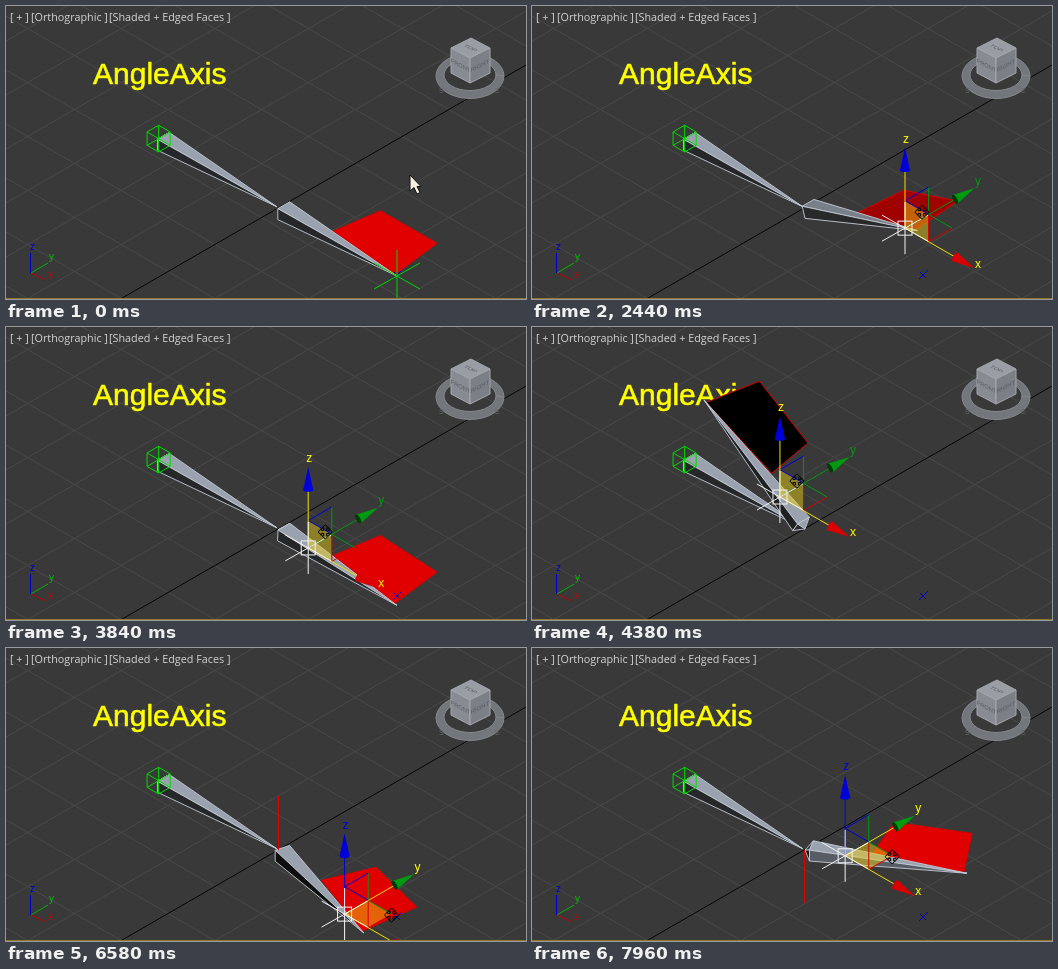
Write an HTML page with a canvas that moves like this. It is 520 by 293 pixels and loops after 8 s.

```html
<!DOCTYPE html>
<html>
<head>
<meta charset="utf-8">
<style>
html, body { margin: 0; width: 100%; height: 100%; overflow: hidden; background: #393939; }
canvas { display: block; }
</style>
</head>
<body>
<canvas id="stage" width="520" height="293"></canvas>
<script>
const ctx = document.getElementById('stage').getContext('2d');
const LOOP = 8000, STEP = 77.3;
const SANS = '"Liberation Sans", Arial, sans-serif';
const UI = '"Open Sans", sans-serif';
const AXES = { x: [1, 0, 0], y: [0, 1, 0], z: [0, 0, 1] };
const COLORS = { x: '#d80000', y: '#009a10', z: '#0000d8' };
const LIGHT = [0.6, -0.1, 0.79];

const sub = (a, b) => a.map((v, i) => v - b[i]);
const add = (a, b) => a.map((v, i) => v + b[i]);
const mul = (a, s) => a.map(v => v * s);
const dot = (a, b) => a[0] * b[0] + a[1] * b[1] + a[2] * b[2];
const cross = (a, b) => [a[1] * b[2] - a[2] * b[1], a[2] * b[0] - a[0] * b[2], a[0] * b[1] - a[1] * b[0]];
const project = ([x, y, z]) => [273 + 118 * (x + y), 202 + 68 * (x - y) - 137 * z];

// Eased progress from 0 to 1 between two times
function ease(t, from, to) {
  const u = Math.min(1, Math.max(0, (t - from) / (to - from)));
  return u * u * (3 - 2 * u);
}
const swing = (t, from, to, degrees) =>
  degrees * Math.sin(2 * Math.PI * Math.min(1, Math.max(0, (t - from) / (to - from))));

// The goal is pulled in close to the joint, circled around it, and put back
const pullIn = (t, start) => 1 - 0.752 * ease(t, start, start + 660);

const DRAGS = [
  { from: 70, to: 950, axes: 'xy', cursor: [47, 1],
    degrees: t => swing(t, 70, 850, -20), reach: () => 1 },
  { from: 1550, to: 2290, axes: 'y', cursor: [33, -14],
    degrees: t => swing(t, 1550, 2270, 15), reach: () => 1.02 - 0.02 * (t => t)(1) },
  { from: 2290, to: 6100, axes: 'xz', cursor: [17, -16],
    degrees: t => 86 * ease(t, 2290, 2830) - 146 * ease(t, 2830, 3411)
      + 315 * ease(t, 3411, 5000) + 105 * ease(t, 5320, 6100),
    reach: t => pullIn(t, 2290) + 0.752 * ease(t, 5320, 6100) },
  { from: 6100, to: 8000, axes: 'xy', cursor: [47, 1],
    degrees: t => -329 * ease(t, 6380, 7960), reach: t => pullIn(t, 6340) }
];
DRAGS[1].reach = t => 1 / Math.cos(DRAGS[1].degrees(t) * Math.PI / 180);

function path(points, stroke, fill, width = 1) {
  ctx.beginPath();
  points.forEach(p => ctx.lineTo(p[0], p[1]));
  if (fill) { ctx.closePath(); ctx.fillStyle = fill; ctx.fill(); }
  if (stroke) { ctx.strokeStyle = stroke; ctx.lineWidth = width; ctx.stroke(); }
}

function label(text, x, y, color, size, font = SANS) {
  ctx.font = size + 'px ' + font;
  ctx.fillStyle = color;
  ctx.fillText(text, x, y);
}

function drawGrid() {
  ctx.fillStyle = '#393939';
  ctx.fillRect(0, 0, 520, 293);
  for (let i = -7; i < 8; i++) {
    const up = 359 + i * 54, down = 10 + i * 54;
    path([[0, up], [520, up - 300]], '#494949');
    path([[0, down], [520, down + 300]], '#494949');
  }
  path([[0, 359], [520, 59]], '#000');
}

function drawTexts() {
  label('[ + ]', 4, 15, '#d4d4d4', 10.8, UI);
  label('[Orthographic ]', 25, 15, '#d4d4d4', 10.8, UI);
  label('[Shaded + Edged Faces ]', 103, 15, '#d4d4d4', 10.8, UI);
  label('AngleAxis', 87, 78, '#ffff00', 30);
  ctx.strokeStyle = '#ffff00';
  ctx.lineWidth = 0.6;
  ctx.strokeText('AngleAxis', 87, 78);
}

// One cube face spanned by two edges that leave the near corner
function cubeFace(text, u, v, fill, right, down) {
  const corner = [464, 52], far = add(add(corner, u), v);
  path([corner, add(corner, u), far, add(corner, v), corner], '#a4a7ac', fill);
  ctx.save();
  ctx.transform(right[0] / 20, right[1] / 20, down[0] / 25, down[1] / 25,
    (corner[0] + far[0]) / 2, (corner[1] + far[1]) / 2);
  ctx.textAlign = 'center';
  label(text, 0, 2, '#585c62', 6);
  ctx.restore();
}

function drawViewCube() {
  ctx.beginPath();
  ctx.ellipse(464, 70, 34, 22.5, 0, 0, 7);
  ctx.ellipse(464, 69, 26, 15.5, 0, 0, 7);
  ctx.fillStyle = '#73767a';
  ctx.fill('evenodd');
  ctx.strokeStyle = '#85888c';
  ctx.lineWidth = 1;
  ctx.stroke();
  label('S', 433, 87, '#666', 7);
  label('E', 489, 87, '#666', 7);
  const left = [-19, -10], right = [20, -10], down = [0, 25];
  cubeFace('TOP', left, right, '#9a9da3', mul(left, -1), mul(right, -1));
  cubeFace('FRONT', left, down, '#888b92', mul(left, -1), down);
  cubeFace('RIGHT', right, down, '#7c7f86', right, down);
}

function drawTripod() {
  path([[24.5, 267], [24.5, 247]], '#0000c8');
  path([[25, 267], [42, 257]], '#00b400');
  path([[25, 267], [40, 274]], '#c00000');
  label('z', 24, 244, '#0000d8', 10);
  label('y', 43, 254, '#00c000', 10);
  label('x', 42, 272, '#d00000', 10);
}

function drawRootCube() {
  const h = 0.049, corner = i => [-1.02 + (i & 1 ? h : -h), i & 2 ? h : -h, i & 4 ? h : -h];
  for (let i = 0; i < 8; i++)
    for (const bit of [1, 2, 4])
      if (!(i & bit)) path([corner(i), corner(i | bit)].map(project), '#00d800');
}

function outward(points, centre) {
  let n = cross(sub(points[1], points[0]), sub(points[2], points[0]));
  n = mul(n, 1 / Math.hypot(...n));
  return dot(n, sub(points[0], centre)) < 0 ? mul(n, -1) : n;
}

const brightness = n => Math.min(1, Math.max(0, dot(n, LIGHT) / 0.79));

function drawBone(place) {
  const ring = [[-1, 1], [1, 1], [1, -1], [-1, -1]].map(([y, z]) => place([0.04, y * 0.05, z * 0.04]));
  const centre = place([0.06, 0, 0]);
  for (const end of [place([0, 0, 0]), place([1, 0, 0])]) {
    ring.forEach((p, i) => {
      const face = [p, ring[(i + 1) % 4], end], n = outward(face, centre);
      if (dot(n, [1, -1, 1]) <= 0) return;
      const rgb = [140, 148, 162].map(c => Math.round(14 + c * brightness(n)));
      path([...face, p].map(project), '#c4ccd6', `rgb(${rgb})`, 0.9);
    });
  }
}

function drawFin(place) {
  const points = [[0.4, 0.06, 0], [0.45, 0.41, 0], [0.93, 0.41, 0], [0.98, 0, 0]].map(p => project(place(p)));
  const n = sub(place([0, 0, 1]), place([0, 0, 0]));
  const front = dot(n, [1, -1, 1]) > 0;
  path([...points, points[0]], '#d80000', front ? `rgb(${Math.round(224 * brightness(n))},0,0)` : '#000');
}

function drawCross([x, y], color) {
  path([[x, y - 26], [x, y + 26]], color);
  path([[x - 23, y - 13], [x + 23, y + 13]], color);
  path([[x - 23, y + 13], [x + 23, y - 13]], color);
}

function drawCone(base, tip, color, baseColor) {
  const [dx, dy] = sub(tip, base), len = Math.hypot(dx, dy);
  const side = [-dy / len * 5, dx / len * 5];
  path([add(base, side), tip, sub(base, side)], null, color);
  ctx.beginPath();
  ctx.ellipse(base[0], base[1], 2, 5, Math.atan2(dy, dx), 0, 7);
  ctx.fillStyle = baseColor;
  ctx.fill();
}

function drawGizmo(goal, active) {
  const at = v => project(add(goal, v));
  const names = Object.keys(AXES);
  if (active.length === 2) {
    const [a, b] = [...active].map(n => mul(AXES[n], 0.2));
    path([goal, add(goal, a), add(goal, add(a, b)), add(goal, b)].map(project), null, 'rgba(235,205,20,.48)');
  }
  for (const n of names) {
    const inner = mul(AXES[n], 0.2), on = active.includes(n);
    for (const m of names)
      if (m !== n) path([at(inner), at(add(inner, mul(AXES[m], 0.2)))], COLORS[n]);
    path([project(goal), at(mul(AXES[n], 0.43))], on ? '#f0e000' : COLORS[n]);
  }
  const [gx, gy] = project(goal);
  drawCross([gx, gy], '#f4f4f4');
  ctx.strokeRect(gx - 7, gy - 7, 14, 14);
  for (const n of names) {
    // The y cone points away from the viewer and shows its dark base
    drawCone(at(mul(AXES[n], 0.425)), at(mul(AXES[n], 0.59)), COLORS[n], n === 'y' ? '#003a06' : COLORS[n]);
    const [x, y] = at(mul(AXES[n], 0.61));
    label(n, x - 2, y - 2, active.includes(n) ? '#ffff00' : COLORS[n], 12);
  }
}

function drawArrow(x, y) {
  const shape = [[0, 0], [0, 16], [4, 12.5], [7, 19], [10, 17.5], [7, 11.5], [11, 11.5]];
  path(shape.map(p => [x + p[0], y + p[1]]), '#111', '#f4f0e0');
}

function drawMoveCursor(x, y) {
  for (let i = 0; i < 4; i++) {
    ctx.save();
    ctx.translate(x, y);
    ctx.rotate(i * Math.PI / 2);
    path([[-1.5, -1.5], [-1.5, -4], [-3.5, -4], [0, -7], [3.5, -4], [1.5, -4], [1.5, -1.5]], '#000');
    ctx.restore();
  }
}

function draw(t) {
  const drag = DRAGS.find(d => t >= d.from && t < d.to);
  const base = t < 5320 ? 3840 : 6580;
  const stepped = base + Math.floor((t - base) / STEP + 0.2) * STEP;
  const angle = drag ? drag.degrees(stepped) * Math.PI / 180 : 0;
  const reach = drag ? drag.reach(stepped) : 1;
  const c = Math.cos(angle), s = Math.sin(angle);
  const vertical = drag && drag.axes === 'xz';
  const turn = ([x, y, z]) => vertical ? [x * c - z * s, y, x * s + z * c] : [x * c - y * s, x * s + y * c, z];
  const goal = turn([reach, 0, 0]);
  const [gx, gy] = project(goal);

  drawGrid();
  drawTexts();
  drawViewCube();
  drawTripod();
  drawBone(p => add(p, [-1.02, 0, 0]));
  drawRootCube();
  drawFin(turn);
  drawBone(turn);
  if (!vertical && Math.abs(s) > 0.01)
    path([[272.5, 202], [272.5, s < 0 ? 148 : 255]], '#e00000');
  path([[387, 273], [396, 264]], '#0000d8');
  path([[388, 266], [394, 272]], '#0000a0');

  if (drag || (t >= 1250 && t < 1550)) drawGizmo(goal, drag ? drag.axes : '');
  else drawCross([gx, gy], '#00d800');

  if (drag) drawMoveCursor(gx + drag.cursor[0], gy + drag.cursor[1]);
  else if (t < 1100) drawArrow(404, 169);
  else {
    const u = Math.min(3, Math.floor((t - 1100) / STEP)) / 3;
    drawArrow(415 + 70 * u, 195 + 55 * u);
  }
  path([[0, 292.5], [520, 292.5]], '#8f7830');
}

function tick(now) {
  draw(now % LOOP);
  requestAnimationFrame(tick);
}
requestAnimationFrame(tick);
</script>
</body>
</html>
```
